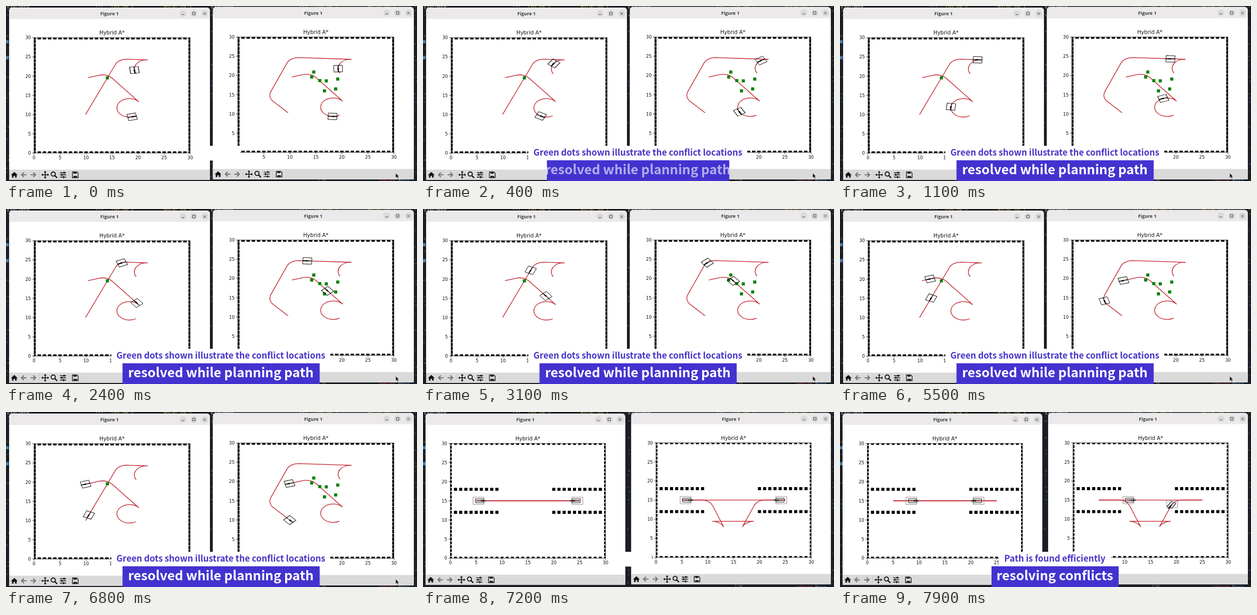
These frames come from a looping animation (792x338 px, 8 s). An HTML page:

```html
<!DOCTYPE html>
<html lang="en">
<head>
<meta charset="utf-8">
<title>Hybrid A* path planning</title>
<style>
  html, body { margin: 0; width: 100%; height: 100%; overflow: hidden; background: #1b1e24; }
  svg { display: block; width: 792px; height: 338px; }
  .plot { font-family: "DejaVu Sans", sans-serif; font-size: 8.5px; fill: #111; }
  .title { font-size: 10.1px; text-anchor: middle; }
  .bar { font: bold 9px "Open Sans", sans-serif; fill: #3c3c3c; text-anchor: middle; }
  .code { font: 9px "DejaVu Sans Mono", monospace; }
  .cap { font-family: "Noto Sans CJK JP", "Noto Sans CJK SC", "Noto Sans", sans-serif; font-weight: bold; text-anchor: middle; }
  .data * { vector-effect: non-scaling-stroke; }
  .route { fill: none; stroke: #c01d27; stroke-width: 1.3; }
  .body { fill: none; stroke: #111; stroke-width: 1; }
  .zone { fill: none; stroke: #a08c8e; stroke-width: 1; }
  .arrow { fill: #000; stroke: #000; stroke-width: .9; }
</style>
</head>
<body>
<svg id="stage" viewBox="0 0 792 338"></svg>
<script>
const LOOP = 8000, CUT = 7100, STEP = 100;
const KX = 10.03, KY = 7.43;
const X = x => 54 + x * KX, Y = y => 284 - y * KY;
const R = 'A2.35 2.35 0 0 ';
const range = (n, f) => Array.from({ length: n }, (_, i) => f(i)).join('');
const rect = (x, y, w, h, fill, more = '') =>
  `<rect x="${x}" y="${y}" width="${w}" height="${h}" fill="${fill}" ${more}/>`;
const text = (x, y, s, more = '') => `<text x="${x}" y="${y}" ${more}>${s}</text>`;

// Routes in plot units
const topArc = `M19.64 20.6${R}0 21.85 24.2`;
const lower = `M19.54 9.69A2.4 2.4 0 1 0 20.14 13.32L14.96 19.52${R}1 12.46 20.2L10.37 19.6`;
const leftTop = `${topArc}L17.75 24.4${R}1 15.6 22.95L9.9 10`;
const rightTop = `${topArc}L11.6 24.66${R}1 9.44 23.2L6.34 15.8${R}1 6.8 13.27L9.65 10.3`;
const eastward = 'M5 15L25 15', westward = 'M25 15L5 15';
const detour = `M25 15L20.75 15${R}1 18.95 13.5L16.7 8${R}0 18.9 9.45` +
  `L10.9 9.45${R}0 13.1 7.95L10.97 13.5${R}1 9.06 15L5 15`;

// Cars reverse up to the cusp, then drive forward; keys are [ms, distance]
const TOP_CUSP = 5.25, LOW_CUSP = 10.89;
const scenes = [
  [
    { at: [0, 0, 1], dots: [[14.1, 19.55]], cars: [
      { d: leftTop, cusp: TOP_CUSP, keys: [[0, 1.05], [1100, 6.05], [2400, 10.25], [3900, 15.75], [5500, 20.7], [6800, 24.65], [7100, 25.55]] },
      { d: lower, cusp: LOW_CUSP, keys: [[0, .75], [1100, 5.35], [2400, 11.5], [3900, 16.55], [5500, 22.25], [6150, 24.35]] }] },
    { at: [392.7, -1.2, 1], cars: [
      { d: rightTop, cusp: TOP_CUSP, keys: [[0, 1.25], [1100, 8.15], [2400, 13.75], [3900, 21.05], [5500, 27.95], [6750, 33.6]] },
      { d: lower, cusp: LOW_CUSP, keys: [[0, 1.4], [1100, 8.05], [2400, 15.4], [3900, 22.6], [4300, 24.35]] }],
      dots: [[14.2, 19.6], [14.6, 20.9], [15.75, 18.67], [17, 18.6], [16.65, 16], [18.8, 16.5], [19.2, 19.07]] }
  ], [
    { at: [-1, 0, .994], walls: true, cars: [
      { d: eastward, cusp: 0, keys: [[CUT, 0], [7900, 3.5]] },
      { d: westward, cusp: 0, keys: [[CUT, 0], [7900, 3.5]] }] },
    { at: [395.3, -1.3, .994], walls: true, cars: [
      { d: eastward, cusp: 0, keys: [[CUT, 0], [7900, 5.7]] },
      { d: detour, cusp: 0, keys: [[CUT, 0], [7900, 6.2]] }] }
  ]
];

const captions = [
  { from: -70, to: CUT, w: [422, 380], lines: ['Green dots shown illustrate the conflict locations', 'resolved while planning path'] },
  { from: CUT, to: LOOP, w: [216, 245], lines: ['Path is found efficiently', 'resolving conflicts'] }
];

function dashes(x1, y1, x2, y2, size, pitch, width, offset) {
  return `<path d="M${x1} ${y1}L${x2} ${y2}" stroke="#000" stroke-width="${width}" ` +
    `stroke-dasharray="${size} ${pitch - size}" stroke-dashoffset="${offset}"/>`;
}

function border(size) {
  const w = size / 2, h = size / 4, l = X(0), r = X(30), t = Y(30), b = Y(0);
  return dashes(l, t + h, r, t + h, size, KX, w, w) + dashes(l, b - h, r, b - h, size, KX, w, w) +
    dashes(l + h, t, l + h, b, size, KY, w, w) + dashes(r - h, t, r - h, b, size, KY, w, w) +
    rect(l, t, r - l, b - t, 'none', 'stroke="#222" stroke-width=".8"');
}

function walls() {
  return [18, 12].map(y => [[1, 9], [20, 29]].map(([a, b]) =>
    dashes(X(a) - 3, Y(y), X(b) + 3, Y(y), 6, KX, 6, 0)).join('')).join('');
}

function ticks() {
  return range(7, i => {
    const v = i * 5, x = X(v), y = Y(v);
    return `<path d="M${x} 284v3.5M54 ${y}h-3.5" stroke="#222" stroke-width=".8"/>` +
      text(x, 296, v, 'text-anchor="middle"') + text(48, y + 3.2, v, 'text-anchor="end"');
  });
}

function toolbar() {
  const arrow = (x, s) => `<path d="M${x + 5 * s} 326H${x - 4 * s}M${x} 321.5L${x - 4.5 * s} 326L${x} 330.5"/>`;
  return rect(6, 316, 387, 20, '#dadada') +
    '<path d="M9.5 326.5L16 320.5L22.5 326.5H20.5V331.5H17.5V328H14.5V331.5H11.5V326.5Z" fill="#111"/>' +
    '<g fill="none" stroke="#777" stroke-width="2.2">' + arrow(34.5, 1) + arrow(52.5, -1) + '</g>' +
    '<path d="M64.5 319v14M121.5 319v14" stroke="#c8c8c8"/>' +
    '<path d="M69 326h13M75.5 319.5v13" stroke="#111" stroke-width="1.6"/>' +
    '<path d="M75.5 318.5l2.6 3h-5.2zM75.5 333.5l2.6-3h-5.2zM68 326l3-2.6v5.2zM83 326l-3-2.6v5.2z" fill="#111"/>' +
    '<g fill="none" stroke="#111"><circle cx="91" cy="324.5" r="4" stroke-width="1.8"/>' +
    '<path d="M94 327.5l4.5 4.5" stroke-width="2.4"/>' +
    '<path d="M104 322h12M104 326h12M104 330.5h12" stroke-width="1.3"/>' +
    '<path d="M112 320v4M107.5 324v4M111 328.5v4" stroke-width="2"/>' +
    '<path d="M128 320.5h8.5l2.5 2.5v8.5h-11z" stroke-width="1.3"/>' +
    '<path d="M130 322.5h6M130 329.5h7" stroke-width="2.6"/></g>';
}

function frame() {
  const glyphs = ['M338.5 16.5h5', 'M359.5 12h5v5h-5z', 'M380.5 12.5l4.5 4.5m0-4.5l-4.5 4.5'];
  return rect(6, 3, 387, 333, '#fff', 'rx="6"') + rect(6, 20, 387, 316, '#fff') +
    '<path d="M6 25V9a6 6 0 0 1 6-6H387a6 6 0 0 1 6 6V25Z" fill="#ebe9ea"/>' +
    text(199.5, 18, 'Figure 1', 'class="bar"') +
    glyphs.map((d, i) => `<circle cx="${341 + i * 21}" cy="14.5" r="6.5" fill="#dad8d9"/>` +
      `<path d="${d}" fill="none" stroke="#444"/>`).join('') +
    toolbar();
}

function car(boxed) {
  const zone = boxed ? '<path class="zone" d="M-1.05 -.95H1.05V.95H-1.05Z"/>' : '';
  const body = boxed ? 'M-.55 -.5H1.05V.5H-.55Z' : 'M-.85 -.83H.85V.83H-.85Z';
  const tail = boxed ? -.3 : -.85;
  return `<g class="car">${zone}<g><path class="body" d="${body}"/>
    <path class="arrow" d="M${tail} 0H${tail + .8}v.12l1 -.12l-1 -.12v.12Z"/></g></g>`;
}

function figure({ at: [x, y, k], cars, dots = [], walls: boxed }) {
  const data = inner => `<g class="data" transform="translate(54 284) scale(${KX} ${-KY})">${inner}</g>`;
  return `<g transform="translate(${x} ${y}) scale(${k})">${frame()}
    <g class="plot">${text(204.3, 55.3, 'Hybrid A*', 'class="title"')}${ticks()}</g>
    ${border(boxed ? 5.6 : 6.6)}${boxed ? walls() : ''}
    ${data(cars.map(c => `<path class="route" d="${c.d}"/>`).join(''))}
    ${dots.map(([a, b]) => rect(X(a) - 3, Y(b) - 3, 6, 6, '#0a820a')).join('')}
    ${data(cars.map(() => car(boxed)).join(''))}</g>`;
}

function editor() {
  let seed = 7;
  const rnd = () => (seed = seed * 16807 % 2147483647) / 2147483647;
  const hues = ['#9a4a4a', '#4f7f5a', '#a08a4a', '#4a6f9a', '#555b66'];
  const bits = range(60, i => {
    const x = [0, 393, 786][i % 3];
    return rect(x + rnd() * 3, Math.round(rnd() * 42) * 8, 1 + rnd() * 4, 3, hues[Math.floor(rnd() * 5)], 'opacity=".35"');
  });
  const tabs = [0, 393].map(x =>
    text(x + 2, 5, 'EXPLORER', 'fill="#a8a8a8"') + text(x + 172, 4, '···', 'fill="#ccc"') +
    text(x + 203, 4, 'cbs.py  2', 'fill="#b8a24c"') + text(x + 304, 4, 'Astar.py 1', 'fill="#b8a24c"')).join('');
  return rect(0, 0, 792, 338, '#1b1e24') + bits +
    rect(0, 66, 5, 6, '#3f7fae') + rect(0, 97, 5, 6, '#3f7fae') +
    `<g class="code">${tabs}${text(600, 340.5, '128', 'fill="#777"')}` +
    `${text(718, 340.5, 'return <tspan fill="#5b7fb0">None</tspan>', 'fill="#b8474d"')}</g>`;
}

function caption({ w, lines }) {
  return `<g class="cap">
    ${rect(414 - w[0] / 2, 270, w[0], 28.5, '#fff')}${rect(414.5 - w[1] / 2, 298, w[1], 40, '#4432d0')}
    ${text(414, 289, lines[0], 'font-size="16.8" fill="#4634c6"')}
    ${text(414, 325, lines[1], 'font-size="25.1" fill="#fff"')}</g>`;
}

const pointer = '<path d="M751 323v9l2.2-2 1.6 3.5 1.5-.7-1.6-3.4h2.8z" fill="#111" stroke="#eee" stroke-width=".4"/>';
const stage = document.getElementById('stage');
stage.innerHTML = editor() +
  scenes.map((s, i) => `<g class="scene">${s.map(figure).join('')}${i ? '' : pointer}</g>`).join('') +
  captions.map(caption).join('');

const all = name => [...stage.querySelectorAll(name)];
const sceneNodes = all('.scene'), capNodes = all('.cap'), routes = all('.route'), carNodes = all('.car');
const cars = scenes.flat().flatMap(f => f.cars);
const clamp = v => Math.max(0, Math.min(1, v));

function keyed(keys, t) {
  let i = 0;
  while (i < keys.length - 2 && t > keys[i + 1][0]) i++;
  const [t0, a] = keys[i], [t1, b] = keys[i + 1];
  return a + (b - a) * clamp((t - t0) / (t1 - t0));
}

// A car may roll straight on past the end of its drawn route
function placeCar(c, i, t) {
  const e = .03, path = routes[i];
  const want = keyed(c.keys, t), s = Math.min(want, path.getTotalLength() - e);
  const p = path.getPointAtLength(s);
  const q = path.getPointAtLength(s < c.cusp ? s - e : s + e);
  const turn = Math.atan2(q.y - p.y, q.x - p.x), over = want - s;
  const x = p.x + over * Math.cos(turn), y = p.y + over * Math.sin(turn);
  carNodes[i].setAttribute('transform', `translate(${x} ${y})`);
  carNodes[i].lastElementChild.setAttribute('transform', `rotate(${turn * 180 / Math.PI})`);
}

function placeCaption(c, i, t) {
  const [white, purple, top, bottom] = capNodes[i].children;
  const on = t >= c.from && t < c.to;
  capNodes[i].style.display = on ? '' : 'none';
  if (!on) return;
  const age = t - c.from;
  [[white, 414, 0], [purple, 414.5, 100]].forEach(([box, mid, delay], k) => {
    const w = c.w[k] * clamp((age - delay) / 400);
    box.setAttribute('width', w);
    box.setAttribute('x', mid - w / 2);
  });
  top.style.opacity = clamp((age - 250) / 200);
  bottom.style.opacity = clamp((age - 350) / 200);
}

function draw(now) {
  const t = Math.floor(now % LOOP / STEP) * STEP;
  const scene = t < CUT ? 0 : 1;
  sceneNodes.forEach((g, i) => g.style.display = i === scene ? '' : 'none');
  cars.forEach((c, i) => placeCar(c, i, t));
  captions.forEach((c, i) => placeCaption(c, i, t));
}

const start = performance.now();
function tick() {
  draw(performance.now() - start);
  requestAnimationFrame(tick);
}
tick();
</script>
</body>
</html>
```
